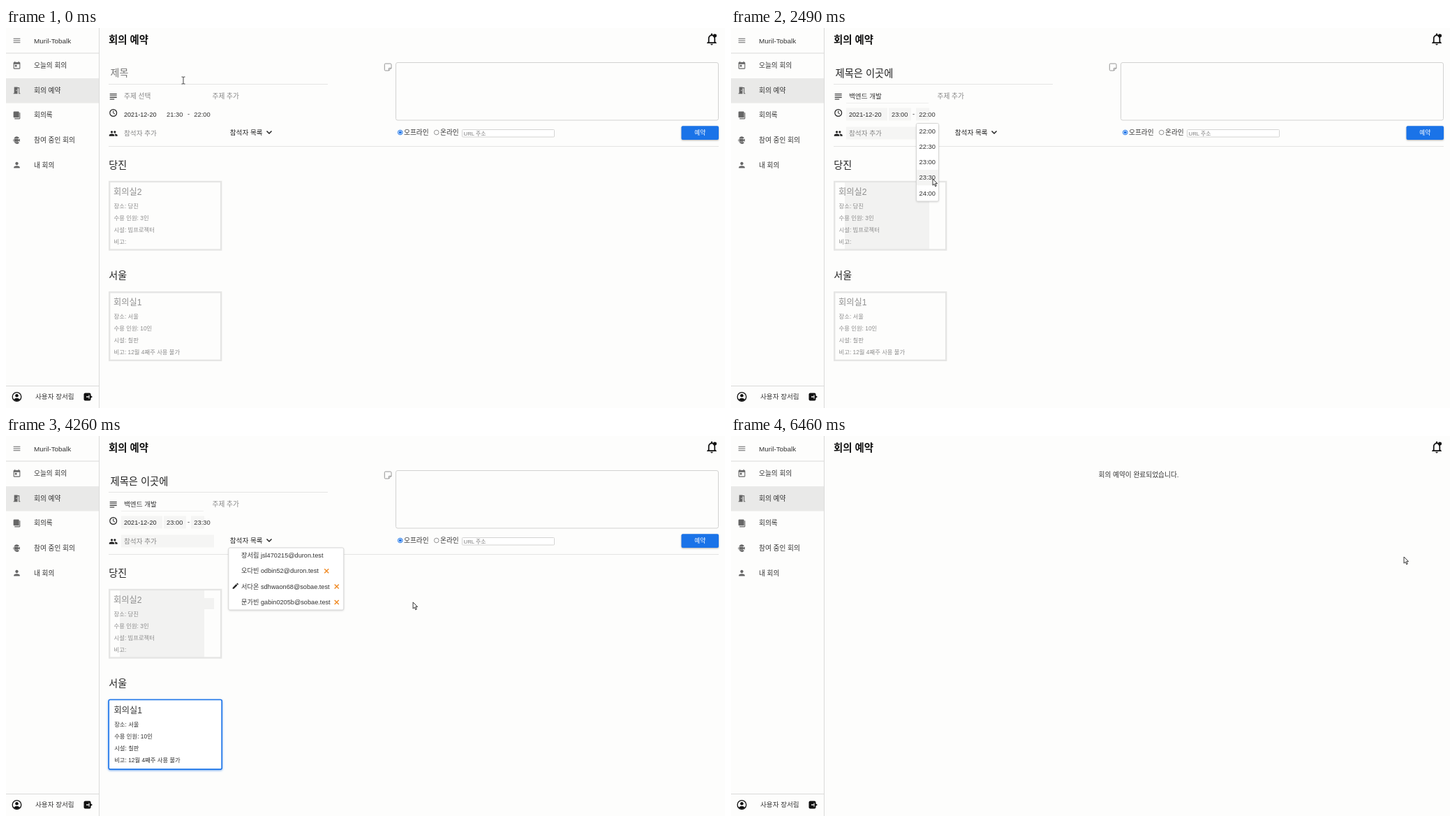
An HTML page for the animation above (6.49 s loop, 1030x544 px).

```html
<!DOCTYPE html>
<html lang="ko">
<head>
<meta charset="utf-8">
<title>회의 예약</title>
<style>
html, body { margin: 0; width: 100%; height: 100%; overflow: hidden; background: #fdfdfc; }
svg { display: block; width: 1030px; height: 544px; }
text { font-family: "Liberation Sans", "Noto Sans CJK KR", "Noto Sans CJK", sans-serif; white-space: pre; }
.pop { filter: drop-shadow(0 1px 1px rgba(0,0,0,.12)); }
.btn { filter: drop-shadow(0 1px 1px rgba(0,0,0,.3)); }
.picked { filter: drop-shadow(0 1.5px 1.5px rgba(26,115,232,.6)); }
</style>
</head>
<body>
<svg viewBox="0 0 1030 544">
  <defs>
    <clipPath id="wide"><rect x="163" y="108" width="121" height="219"/></clipPath>
    <clipPath id="wider"><path d="M163 108h121v33h14v19h-14v72h14v16h-14v79h-121z"/></clipPath>
    <clipPath id="times"><rect x="226" y="136.5" width="33" height="111.5"/></clipPath>
  </defs>
  <g id="frame"></g>
  <g id="page"></g>
  <g id="pointer"></g>
</svg>
<script>
const LOOP = 6490, DONE = 6020, ROW = 22.3;
const INK = '#333', SOFT = '#868686', LINE = '#e4e4e3', BLUE = '#1a73e8', TINT = '#f4f4f3';
const $ = id => document.getElementById(id);

// Basic shapes; text is placed by the middle of its line.
const text = (x, cy, size, str, fill = INK, extra = '') =>
  `<text x="${x}" y="${cy + size * .36}" font-size="${size}" fill="${fill}" ${extra}>${str}</text>`;
const rect = (x, y, w, h, fill, extra = '') =>
  `<rect x="${x}" y="${y}" width="${w}" height="${h}" fill="${fill}" ${extra}/>`;
const path = (d, fill, extra = '') => `<path d="${d}" fill="${fill}" ${extra}/>`;
const line = (d, color = INK, w = 1) => path(d, 'none', `stroke="${color}" stroke-width="${w}"`);
const icon = (cx, cy, size, d, fill = '#666') =>
  path(d, fill, `fill-rule="evenodd" transform="translate(${cx - size / 2} ${cy - size / 2}) scale(${size / 24})"`);

const ICON = {
  menu: 'M3 18h18v-2H3zM3 13h18v-2H3zM3 6v2h18V6z',
  today: 'M19 3h-1V1h-2v2H8V1H6v2H5c-1.1 0-2 .9-2 2v14c0 1.1.9 2 2 2h14c1.1 0 2-.9 2-2V5c0-1.1-.9-2-2-2zm0 16H5V8h14zM7 10h5v5H7z',
  room: 'M14 6v15H3v-2h2V3h9v1h5v15h2v2h-4V6zm-4 5v2h2v-2z',
  book: 'M5 2h11q2 0 2 2v14H5q-2 0-2-2V4q0-2 2-2zM19 5h2v15q0 2-2 2H6v-2h13z',
  camera: 'M6 8h9q1 0 1 1v2l4-3v8l-4-3v2q0 1-1 1H6q-1 0-1-1V9q0-1 1-1zM5 6Q11-1 18 5l-1 2H6zM6 17h11l1 2q-6 6-13-1zM4 7v10q-3-5 0-10z',
  person: 'M12 12c2.2 0 4-1.8 4-4s-1.8-4-4-4-4 1.8-4 4 1.8 4 4 4zm0 2c-2.7 0-8 1.3-8 4v2h16v-2c0-2.7-5.3-4-8-4z',
  group: 'M16 11a3 3 0 1 0 0-6 3 3 0 0 0 0 6zm-8 0a3 3 0 1 0 0-6 3 3 0 0 0 0 6zm0 2c-2.3 0-7 1.2-7 3.5V19h14v-2.5c0-2.3-4.7-3.5-7-3.5zm8 0l-1 .1c1.2.8 2 1.9 2 3.4V19h6v-2.5c0-2.3-4.7-3.5-7-3.5z',
  subject: 'M2 4h20v2.2H2zM2 9h20v2.2H2zM2 14h20v2.2H2zM2 19h13v2.2H2z',
  bell: 'M12 22c1.1 0 2-.9 2-2h-4c0 1.1.9 2 2 2zm6-6v-5c0-3.1-1.6-5.6-4.5-6.3V4a1.5 1.5 0 0 0-3 0v.7C7.6 5.4 6 7.9 6 11v5l-2 2v1h16v-1zm-2 1H8v-6c0-2.5 1.5-4.5 4-4.5s4 2 4 4.5z',
  edit: 'M3 17.3V21h3.8L17.8 9.9l-3.7-3.7zM20.7 7c.4-.4.4-1 0-1.4l-2.3-2.3c-.4-.4-1-.4-1.4 0l-1.9 1.8 3.8 3.8z'
};

const MENU = [['today', '오늘의 회의'], ['room', '회의 예약'], ['book', '회의록'],
  ['camera', '참여 중인 회의'], ['person', '내 회의']];
const PEOPLE = ['장서림 jsl470215@duron.test', '오다빈 odbin52@duron.test',
  '서다온 sdhwaon68@sobae.test', '문가빈 gabin0205b@sobae.test'];
const TITLE = '제목은 이곳에', MEMO = '연필 챙겨오세요~', TOPIC = '백엔드 개발';

// Pointer stops: time, x, y, shape.
const STOPS = [
  [0, 254, 75, 'beam'], [730, 254, 75, 'beam'], [820, 228, 98, 'beam'], [870, 228, 98, 'hand'],
  [950, 205, 118, 'hand'], [990, 205, 118, 'hand'], [1060, 244, 124, 'hand'], [1090, 244, 124, 'hand'],
  [1140, 246, 193, 'hand'], [1320, 246, 193, 'hand'], [1380, 243, 223, 'hand'], [1640, 243, 223, 'hand'],
  [1840, 280, 124, 'hand'], [1920, 280, 124, 'hand'], [2160, 286, 219, 'arrow'], [2190, 286, 219, 'arrow'],
  [2220, 289, 216, 'arrow'], [2560, 289, 216, 'arrow'], [2680, 250, 420, 'hand'], [2750, 250, 420, 'hand'],
  [2870, 230, 152, 'beam'], [2910, 230, 152, 'hand'], [2950, 235, 172, 'hand'], [3220, 235, 172, 'arrow'],
  [3440, 383, 203, 'arrow'], [3560, 362, 156, 'hand'], [3820, 362, 156, 'hand'], [3930, 352, 215, 'hand'],
  [4010, 352, 215, 'arrow'], [4190, 583, 238, 'arrow'], [4260, 583, 238, 'arrow'], [4350, 800, 62, 'beam'],
  [5735, 800, 62, 'arrow'], [5820, 998, 157, 'hand'], [DONE, 998, 157, 'arrow'], [6200, 998, 157, 'arrow'],
  [6350, 986, 162, 'arrow'], [6460, 964, 173, 'arrow'], [LOOP, 964, 173, 'arrow']
];
const CLICKS = [830, 960, 1070, 1530, 1880, 2510, 2700, 2880, 2960, 3030, 3160, 3760, 3950, 4330, 5880];

const SHAPES = {
  beam: line('M-2.5-5H-.5L0-4.5.5-5H2.5M0-5V5M-2.5 5H-.5L0 4.5.5 5H2.5', '#444'),
  arrow: path('M0 0v9.2l2.1-1.9 1.6 3.5 1.5-.7-1.6-3.4h2.9z', '#fff', 'stroke="#222" stroke-width=".9"'),
  hand: path('M-1 .5a1 1 0 0 1 2 0V5l4 .8q1.5.4 1.2 1.9l-.7 3-.8 2.3H0L-3.4 8.3q-.7-1.2.6-1.4L-1 8z', '#fff',
    'stroke="#222" stroke-width=".9" stroke-linejoin="round"')
};

const pen = document.createElement('canvas').getContext('2d');
function width(str, size) {
  pen.font = `${size}px "Liberation Sans", "Noto Sans CJK KR", "Noto Sans CJK", sans-serif`;
  return pen.measureText(str).width;
}

function pointerAt(t) {
  let i = 0;
  while (i < STOPS.length - 2 && STOPS[i + 1][0] <= t) i++;
  const [t0, x0, y0, shape] = STOPS[i], [t1, x1, y1] = STOPS[i + 1];
  const k = Math.min(1, Math.max(0, (t - t0) / (t1 - t0))), e = k * k * (3 - 2 * k);
  return { x: x0 + (x1 - x0) * e, y: y0 + (y1 - y0) * e, shape };
}

function drawFrame() {
  const items = MENU.map(([name, label], i) => {
    const y = 53.8 + i * 35.6;
    return icon(15.5, y, 13, ICON[name]) + text(40, y, 9.7, label);
  }).join('');
  $('frame').innerHTML = rect(0, 0, 1030, 544, '#fdfdfc') + rect(0, 72, 133, 35.5, '#e9e9e8') +
    line('M133.5 0V544M0 36H133M0 512.5H133', '#dadad9') +
    icon(15.5, 18, 13, ICON.menu) + text(40, 18, 9.9, 'Muril-Tobalk') + items +
    '<circle cx="15.5" cy="528" r="6.3" fill="none" stroke="#111" stroke-width="1.3"/>' +
    '<circle cx="15.5" cy="526.2" r="2.3" fill="#111"/>' + path('M11 531.8q4.5-4 9 0-4.5 4.500-9 0z', '#111') +
    text(42, 528, 9.6, '사용자 장서림') +
    rect(111.5, 522.5, 10, 11, '#111', 'rx="2"') + line('M115 528H120', '#fff', 1.4) +
    path('M119.500 525l4.500 3-4.500 3z', '#111') + line('M119 525v6', '#fff', .8) +
    text(147, 17, 14.4, '회의 예약', '#111', 'font-weight="bold"') +
    icon(1011, 16, 20.6, ICON.bell, '#111') + '<circle cx="1015.5" cy="11" r="2.6" fill="#111"/>';
}

function panel(x, y, w, h) {
  return rect(x + .5, y + .5, w - 1, h - 1, '#fff', 'rx="2" stroke="#d6d6d5" class="pop"');
}

function timeList(x, first, start, p) {
  let s = '';
  for (let i = 0; i < 6; i++) {
    const cy = first + i * ROW, m = start + i * 30;
    if (cy > 250) break;
    if (Math.abs(p.y + 1 - cy) < ROW / 2 && p.y > 136) s += rect(x + 1, cy - ROW / 2, 31, ROW, TINT);
    s += text(x + 4.5, cy, 9.4, `${Math.floor(m / 60)}:${m % 60 ? '30' : '00'}`);
  }
  return panel(x, 136, 33, 112.5) + `<g clip-path="url(#times)" ${x > 226 ? `style="clip-path:none"` : ''}>${s}</g>`;
}

function card(y, lines, on) {
  const dx = on ? .6 : 0, c = on ? INK : '#8e8e8e';
  const box = on
    ? rect(147.2, y + .2, 162, 99.6, '#fff', `rx="2" stroke="${BLUE}" stroke-width="1.6" class="picked"`)
    : rect(148.2, y + 1, 160, 97.5, 'none', 'stroke="#e5e5e4" stroke-width="2.4"');
  return box + lines.map((s, i) => i
    ? text(154.6 + dx, y + 19 + i * 17, 8.35, s, c)
    : text(154 + dx, y + 15.300, 12.2, s, c)).join('');
}

function form(t, p) {
  const has = (a, b) => t >= a && t < b;
  const typed = t < 30 ? '' : TITLE.slice(0, Math.floor((t - 30) / 73.3) + 1);
  const topic = t >= 980, from = t >= 1630 ? '23:00' : '21:30', to = t >= 2550 ? '23:30' : '22:00';
  let s = '';

  if (topic) s += `<g clip-path="url(#${t < 3200 ? 'wide' : 'wider'})">` +
    rect(149, 221, 159, 96, '#f2f2f1') + rect(165, 114.500, 59, 18, '#f5f5f4') +
    rect(226, 114.500, 32, 18, '#f5f5f4') + rect(265, 114.500, 33, 18, '#f5f5f4') +
    rect(165, 141.500, 133, 18, '#f5f5f4') + '</g>' + line('M165 107.5H283', '#eeeeed');

  s += line('M147 80.5H461M147 169.5H1021', LINE) +
    (typed ? text(149.5, 65, 14.3, typed, '#222') : text(149.5, 63.5, 14, '제목', '#777')) +
    icon(153.700, 98, 12, ICON.subject, '#222') +
    (topic ? text(169, 98, 9.65, TOPIC) : text(169, 97.500, 9.7, '주제 선택', SOFT)) +
    text(295.500, 97.500, 9.7, '주제 추가', SOFT) +
    '<circle cx="153.7" cy="121.5" r="4.9" fill="none" stroke="#222" stroke-width="1.2"/>' +
    line('M153.7 118.500V121.800L156 123.2', '#222') +
    text(169, 123.500, 9.1, '2021-12-20', '#222') + text(230, 123.500, 9.4, from) +
    text(260, 122.500, 9.4, '-') + text(269.3, 123.500, 9.4, to) +
    icon(153.700, 151, 13, ICON.group, '#222') + text(169, 150.500, 9.65, '참석자 추가', SOFT) +
    text(320.700, 149.700, 9.65, '참석자 목록', '#222') + line('M373.500 147.500l3.500 3.500 3.500-3.500', '#222', 1.5);

  // Memo, place and submit.
  const memo = t < 4640 ? '' : t < 4920 ? MEMO[0] : MEMO.slice(0, t < 5730 ? Math.min(8, 2 + Math.floor((t - 4920) / 73)) : 9);
  s += rect(558.5, 49.5, 462, 82.500, '#fdfdfc', 'rx="2.5" stroke="#d2d2d1"') +
    line('M543.500 51H550.500Q552 51 552 52.500V57.500L548.500 61H543.500Q542.300 61 542.300 59.500V52.500Q542.300 51 543.500 51zM552 57.500H548.500V61', '#888', .9) +
    text(560.800, 58, 9.5, memo);
  if (t >= 4480) s += rect(560.300 + width(memo, 9.5), 52.500, .9, 10, '#222');
  s += `<circle cx="564.700" cy="149.500" r="3.300" fill="#fff" stroke="${BLUE}"/><circle cx="564.700" cy="149.500" r="2" fill="${BLUE}"/>` +
    text(570, 149.800, 9.7, '오프라인') +
    '<circle cx="616.700" cy="149.500" r="3.300" fill="#fff" stroke="#777" stroke-width=".8"/>' +
    text(622, 149.800, 9.7, '온라인') +
    rect(653.5, 145.5, 132, 10.500, '#fff', 'rx="1" stroke="#d4d4d3"') + text(655.500, 150.700, 7.8, 'URL 주소', '#7c7c7c') +
    rect(967.5, 140.300, 53.500, 19.700, p.x > 967 && p.y > 140 ? '#1a60c2' : BLUE, 'rx="2" class="btn"') +
    text(994.300, 150.200, 8.7, '예약', '#fff', 'text-anchor="middle" font-weight="500"');

  s += text(147.3, 195.500, 14, '당진', '#222') +
    card(219, ['회의실2', '장소: 당진', '수용 인원: 3인', '시설: 빔프로젝터', '비고:'], false) +
    text(147.3, 354, 14, '서울', '#222') +
    card(377.3, ['회의실1', '장소: 서울', '수용 인원: 10인', '시설: 칠판', '비고: 12월 4째주 사용 불가'], t >= 2710);

  // Pop-up lists.
  if (has(860, 980)) s += panel(163, 108, 121, 219) + rect(164, 109, 119, ROW, TINT) + text(169, 120, 9.65, TOPIC);
  if (has(1085, 1630)) s += timeList(226, 136.2, 1260, p);
  if (has(1900, 2550)) s += timeList(265, 147.2, 1320, p);
  if (has(2900, 3200)) {
    const left = PEOPLE.slice(t < 2990 ? 1 : t < 3040 ? 2 : 3);
    s += panel(163, 160, 149, left.length * ROW + 1) +
      left.map((who, i) => (i ? '' : rect(164, 161, 147, ROW - 1, TINT)) + text(169, 171 + i * ROW, 9.2, who)).join('');
  }
  if (has(3790, 4330)) {
    s += panel(318.300, 159.500, 166, 90) + PEOPLE.map((who, i) => {
      const y = 170.700 + i * ROW, x = i > 1 ? 473.700 : 459.200;
      return text(337, y, 9.2, who) + (i ? line(`M${x - 3} ${y - 2.700}l6 6m0-6l-6 6`, '#f08a24', 1.4) : '');
    }).join('');
    if (t >= 3960) s += icon(328.800, 214.700, 11, ICON.edit, '#222');
  }
  return s;
}

let last = '';
function draw(t) {
  const p = pointerAt(t);
  const page = t < DONE ? form(t, p) : text(526.500, 55.3, 9.7, '회의 예약이 완료되었습니다.');
  if (page !== last) $('page').innerHTML = last = page;
  const glow = CLICKS.some(c => t >= c && t < c + 90);
  $('pointer').innerHTML = `<g transform="translate(${p.x} ${p.y})">` +
    (glow ? '<circle cy="1" r="7" fill="#fff000" opacity=".7"/>' : '') + SHAPES[p.shape] + '</g>';
}

drawFrame();
const begin = performance.now();
function tick() {
  draw((performance.now() - begin) % LOOP);
  requestAnimationFrame(tick);
}
draw(0);
requestAnimationFrame(tick);
</script>
</body>
</html>
```
